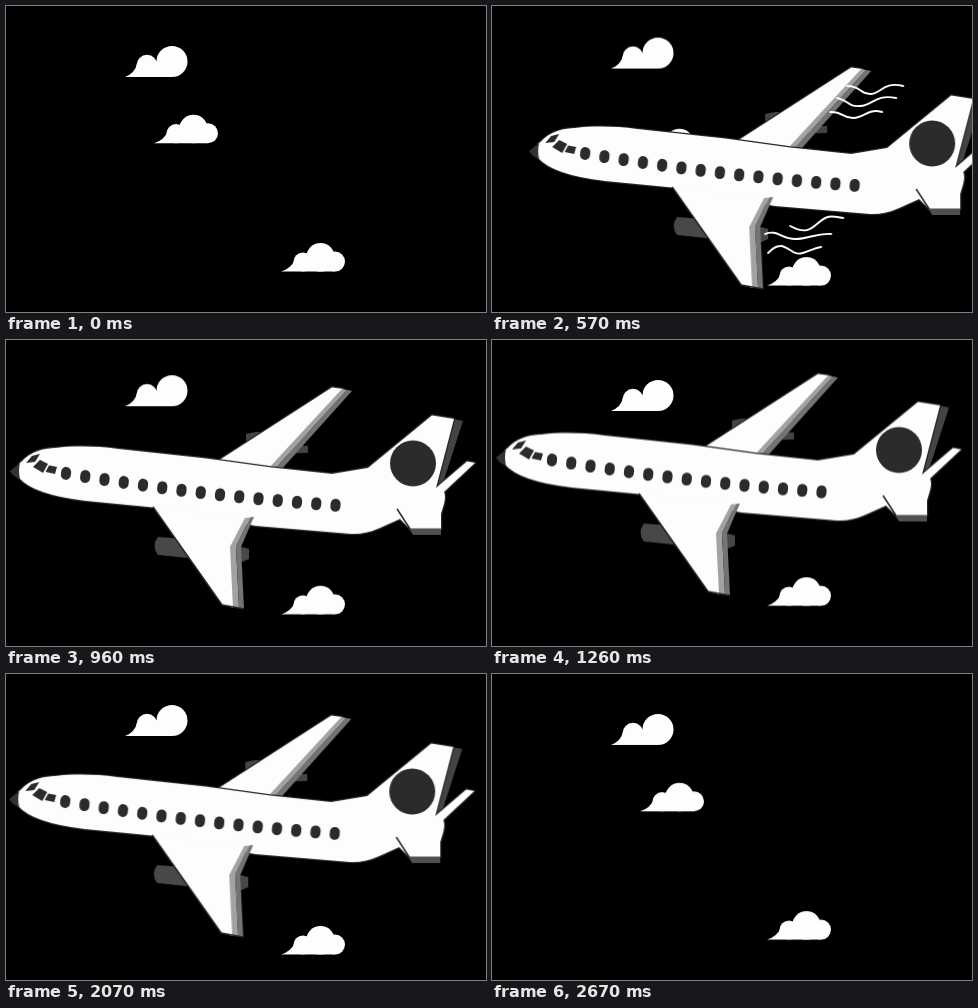
An HTML page that plays this animation: 480x306 px, repeating every 2700 ms.

```html
<!DOCTYPE html>
<html lang="en">
<head>
<meta charset="utf-8">
<title>Plane and clouds</title>
<style>
  html, body { margin: 0; width: 100%; height: 100%; overflow: hidden; background: #000; }
  svg { display: block; width: 100vw; height: 100vh; }

  .fly, .bob, .rise, .sink, .wind {
    animation: 2700ms infinite cubic-bezier(.364, 0, .636, 1);
  }
  .fly { animation-name: fly; }
  .bob { animation-name: bob; }
  .rise { animation-name: rise; }
  .sink { animation-name: sink; }
  .wind { animation-name: wind; animation-timing-function: linear; }

  @keyframes fly {
    0% { transform: translateX(480px); }
    8.78% { transform: translateX(480px); animation-timing-function: cubic-bezier(.333, .667, .667, 1); }
    25.56% { transform: none; }
    76.04% { transform: none; animation-timing-function: cubic-bezier(.333, 0, .667, .333); }
    92.81%, 100% { transform: translateX(-500px); }
  }
  @keyframes bob {
    0% { transform: translateY(14px); }
    20.56% { transform: translateY(20px); }
    51.1% { transform: translateY(-9px); }
    86.67%, 100% { transform: translateY(2px); }
  }
  @keyframes rise {
    0%, 46.7%, 51.9%, 100% { transform: none; }
    25.3%, 77.2% { transform: translateY(-9px); }
  }
  @keyframes sink {
    0%, 48.4%, 100% { transform: none; }
    25.3%, 77.9% { transform: translateY(15px); }
  }
  @keyframes wind {
    0%, 22.5% { opacity: 1; }
    29%, 100% { opacity: 0; }
  }

  .white { fill: #fdfdfd; }
  .hull { fill: #fdfdfd; stroke: #262626; stroke-width: 2.6; stroke-linejoin: round; paint-order: stroke; }
  .ink { fill: #2b2b2b; }
  .light { fill: #a2a2a2; }
  .mid { fill: #747474; }
  .dim { fill: #444; }
  .line { fill: none; stroke: #262626; stroke-width: 1.5; stroke-linejoin: round; }
  .wind { fill: none; stroke: #fdfdfd; stroke-width: 1.9; stroke-linecap: round; }
</style>
</head>
<body>
<svg viewBox="0 0 480 306" preserveAspectRatio="none">
  <defs>
    <g id="cloud" class="white">
      <path d="M0 0Q10 -3 14 -12L54 -18V0Z"/>
      <circle cx="22" cy="-9.6" r="9.6"/>
      <circle cx="39.5" cy="-14.3" r="14.3"/>
      <circle cx="54" cy="-10" r="10"/>
    </g>
  </defs>

  <g class="sink"><use href="#cloud" x="148" y="137.3"/></g>

  <g class="fly"><g class="bob">
    <!-- upper engine and wing -->
    <path class="dim" d="M240 88L250 86L302 88V94H297V100H302V107L262 108L240 96Z"/>
    <path class="hull" d="M212 115L326 41.5L337 43L265 123Z"/>
    <path class="light" d="M336 43L341 44L269 123L263 122Z"/>
    <path class="mid" d="M341 44L346 45L275 124L269 123Z"/>

    <!-- tail and body -->
    <path class="dim" d="M447 73L457 75L436 140L426 148Z"/>
    <path class="hull" d="M13 118C20 112 26 103 50 102C66 100 90 100 112 103L200 112.5L265 121.5L326 128L362 122L426 69.5L448 73L430 142L461 115.5L469 117L438 146Q440 150 438 158L435 168V183H404L394 173L374 182Q360 188.5 345 188L250 180L147 161.5L80 155Q28 149 13 132Z"/>
    <path fill="#505050" d="M403 182.5H435V189H407Z"/>
    <path class="line" d="M391 163L404 183"/>
    <path d="M4 125L14 117Q12 125 14 133Q7 131 4 125Z" fill="#333"/>
    <path class="ink" d="M20 117L26 110L34 108L29 116ZM27 121L34 114L42 118L37 127ZM39.5 126L43 119.5L51 121L49 128Z"/>
    <g id="windows" class="ink"></g>
    <circle class="ink" cx="407" cy="117.5" r="23"/>

    <!-- lower engine and wing -->
    <path fill="#484848" d="M152 191L190 194L200 214L152 209Q145 200 152 191ZM232 200L243 203V213L234 217Z"/>
    <path class="white" d="M147 161L216 259L228 262L225 201L240 172Z"/>
    <path class="light" d="M239 172L244 171.5L230 201L233 262L227 262L224 201Z"/>
    <path class="mid" d="M244 171.5L248 171L235 201L238 263L233 262L230 201Z"/>
    <path class="line" d="M147 161L216 259L238 263"/>

    <path class="wind" d="M322 60C336 60 334 68 345 68S358 55 378 60M312 72C325 75 322 81 335 80S350 68 371 72M305 86C318 85 316 92 328 92S342 82 357 86M265 200C280 208 285 204 293 197S305 189 318 192M240 208C252 203 256 213 270 213S290 207 306 208M243 227C254 215 260 221 268 226S284 223 296 221"/>
  </g></g>

  <g class="rise"><g class="white" transform="translate(119 71)">
    <path d="M0 0Q10 -4 12 -13L34 -16L47 -12V0Z"/>
    <circle cx="22" cy="-11.7" r="10.5"/>
    <circle cx="47" cy="-15.5" r="15.5"/>
  </g></g>
  <g class="sink"><use href="#cloud" x="275" y="265.6"/></g>
</svg>
<script>
  const row = document.getElementById('windows');
  for (let i = 0; i < 15; i++) {
    const pane = document.createElementNS('http://www.w3.org/2000/svg', 'rect');
    const x = 60 + 19.25 * i;
    const y = 127.5 + 3.2 * i - 0.066 * i * i;
    const box = { x: x - 5, y: y - 6.4, width: 10, height: 12.8, rx: 4.8, transform: `rotate(6 ${x} ${y})` };
    for (const key in box) pane.setAttribute(key, box[key]);
    row.append(pane);
  }
</script>
</body>
</html>
```
